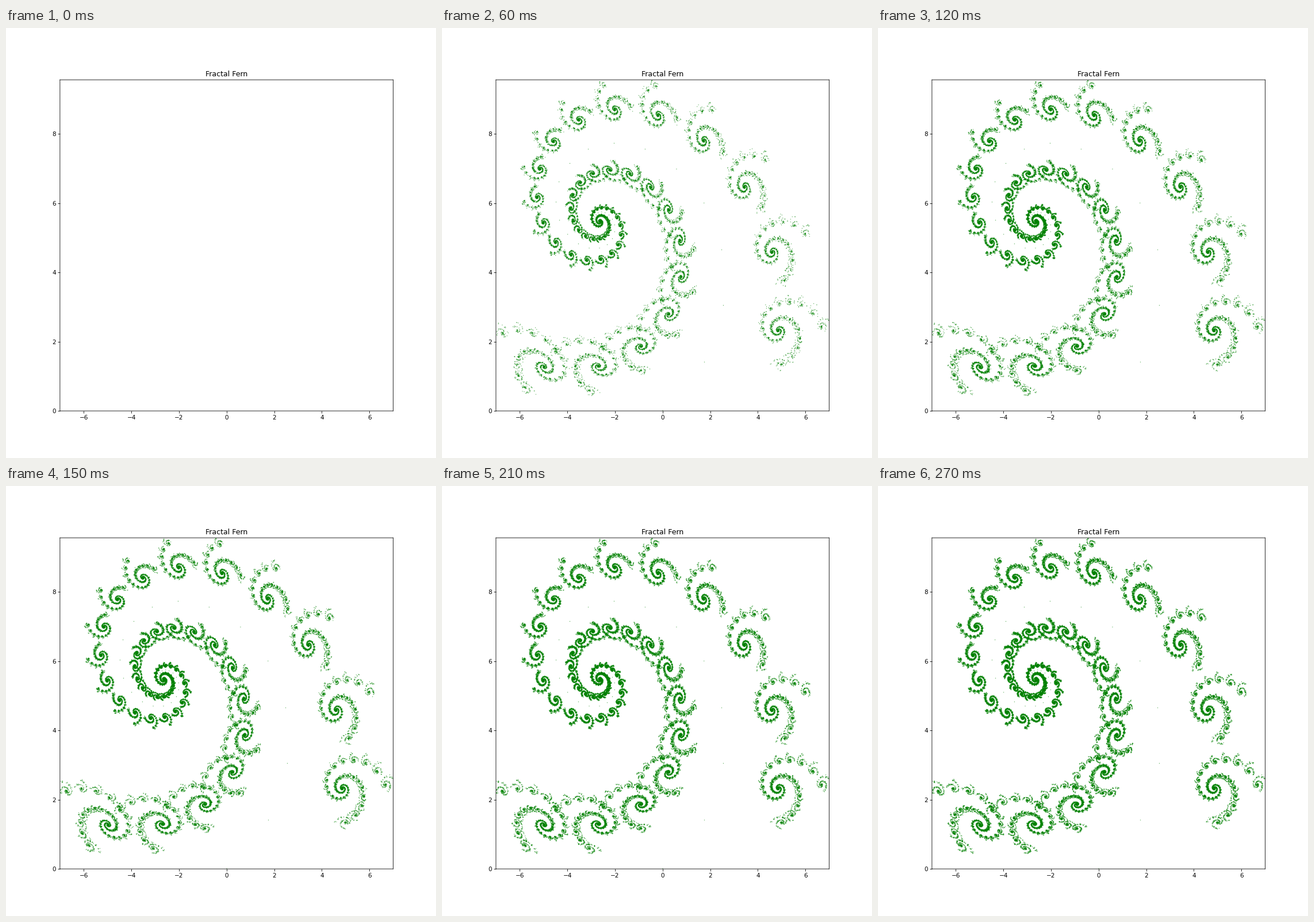
Animation, 748 px wide and 748 px high, one loop 0.3 s. Source, as a matplotlib script:

```python
import numpy as np
import matplotlib.pyplot as plt
from matplotlib.animation import FuncAnimation

FRAMES = 10
INTERVAL = 30
POINTS_PER_FRAME = 20000
SPIRAL_SHARE = 0.92  # chance of following the main spiral, the rest makes leaves
WARMUP = 22          # opening steps that only follow the main spiral
SOFT_EDGE = 0.15     # how much a dot covers each neighbouring cell
X_LIM = (-7, 7)
Y_LIM = (0, 9.56)
CELLS = (770, 775)   # rows and columns of the dot grid
HALF_CELL = 0.0005   # half a grid cell as a share of the figure


def spiral(z):
    return (0.82386 + 0.33333j) * z - (0.03598 + 0.09091j) * z.conjugate() + 1.75865 + 1.40807j


def left_leaf(z):
    return -(0.03409 + 0.05303j) * z + (-0.08712 + 0.20455j) * z.conjugate() - 6.72165 + 1.37724j


def right_leaf(z):
    return (0.18182 + 0.11364j) * z - 0.02273j * z.conjugate() + 6.08611 + 1.56804j


def chaos_game(count):
    rng = np.random.default_rng(7)
    rolls = rng.random(count)
    rolls[:WARMUP] = 0
    left_limit = (1 + SPIRAL_SHARE) / 2
    points = np.empty(count, dtype=complex)
    z = 0j
    for i, roll in enumerate(rolls.tolist()):
        points[i] = z
        if roll < SPIRAL_SHARE:
            z = spiral(z)
        elif roll < left_limit:
            z = left_leaf(z)
        else:
            z = right_leaf(z)
    return points


def dot_layer(count):
    """Green RGBA layer: hit cells are opaque, their neighbours soft."""
    dots = points[:count]
    hits, _, _ = np.histogram2d(dots.imag, dots.real, bins=CELLS,
                                range=(Y_LIM, X_LIM))
    pad = np.pad(hits, 1)
    near = pad[2:, 1:-1] + pad[:-2, 1:-1] + pad[1:-1, 2:] + pad[1:-1, :-2]
    cover = np.where(hits > 0, 1, 1 - (1 - SOFT_EDGE) ** near)
    layer = np.zeros(CELLS + (4,), dtype=np.uint8)
    layer[..., 1] = 128
    layer[..., 3] = np.round(255 * cover)
    return layer


points = chaos_game(FRAMES * POINTS_PER_FRAME)

fig, ax = plt.subplots(figsize=(10, 10), dpi=74.8)
fig.subplots_adjust(left=0.125 + HALF_CELL, right=0.9 + HALF_CELL,
                    bottom=0.11 - HALF_CELL, top=0.88 - HALF_CELL)
ax.set_title("Fractal Fern")
for spine in ax.spines.values():
    spine.set_snap(False)
image = ax.imshow(dot_layer(0), extent=X_LIM + Y_LIM, origin="lower",
                  aspect="auto", interpolation="hanning")
ax.set_xlim(X_LIM)
ax.set_ylim(Y_LIM)


def update(frame):
    image.set_data(dot_layer(frame * POINTS_PER_FRAME))
    return [image]


anim = FuncAnimation(fig, update, frames=FRAMES, interval=INTERVAL,
                     repeat=True, repeat_delay=0)
plt.show()
```
